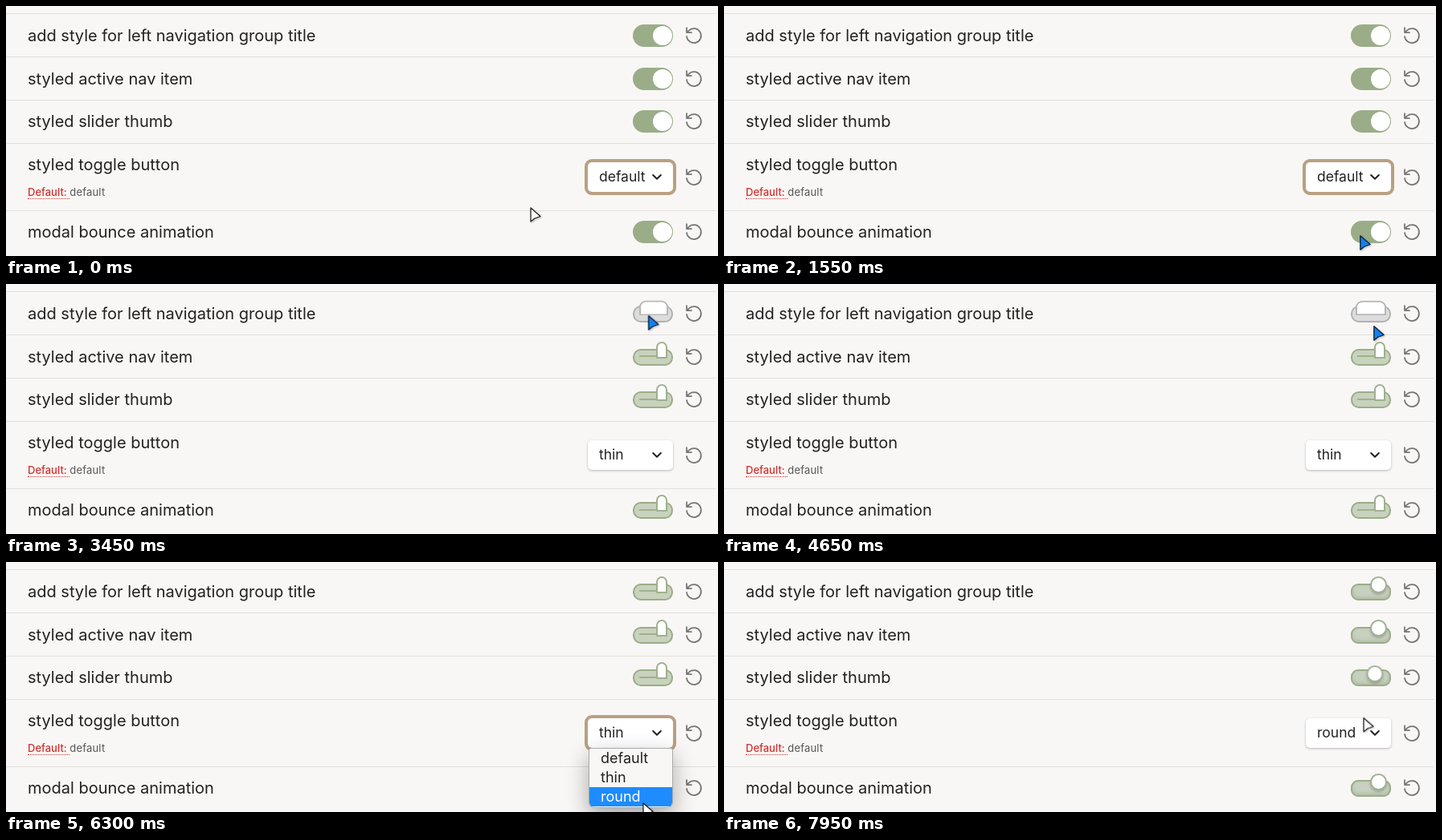
Animation of 886x312 px, one loop 8 s. Source, as an HTML page:

```html
<!DOCTYPE html>
<html lang="en">
<head>
<meta charset="utf-8">
<title>Toggle styles</title>
<style>
html, body { margin: 0; width: 100%; height: 100%; overflow: hidden; }
body { position: relative; background: #f9f7f5; color: #222; font: 20px/24px Inter, sans-serif; }
body *, body *::before { position: absolute; box-sizing: border-box; white-space: pre; }

/* Every animation shares one 8 s clock */
.track, .thumb, .press, .tap, .line, .ring, .value, .menu, .menu li, .cursor, .blue {
  animation: 8s linear infinite;
}

.row { left: 0; width: 883px; border-top: 1px solid #e2dfdb; }
.row > b { left: 27px; top: 14.8px; font-weight: 400; }
.row > svg { left: 844px; top: 14.8px; width: 24px; height: 24px; fill: none; stroke: #777; stroke-width: 1.75; stroke-linecap: round; stroke-linejoin: round; }
.row > .note ~ svg { top: 30.2px; }
.note { left: 27px; top: 52.4px; font-size: 13px; line-height: 17px; letter-spacing: .2px; color: #555; }
.note i { position: static; font-style: normal; font-weight: 500; letter-spacing: 0; color: #d0302f; border-bottom: 1px dotted #d0302f; }

.toggle { left: 780px; top: 12.8px; width: 50px; height: 28px; }
.track { left: 0; width: 50px; border: 2px solid #9aad88; animation-name: track; }
.line { left: 8px; top: 12.5px; width: 34px; height: 2px; background: #9fb08f; animation-name: line; animation-timing-function: step-end; }
.thumb { box-sizing: content-box; background: #fff; border: 2px solid #fff; transform-origin: bottom; animation-name: thumb; }
.press { animation-name: gray; }
.press .thumb { animation-name: thumb, stretch; }
.tap .thumb { animation-name: thumb, push; }

@keyframes track {
  0%, 20% { top: 0; height: 28px; border-radius: 14px; background: #9aad88; box-shadow: none; }
  22%, 80% { top: 4px; height: 21px; border-radius: 10px; background: #c8d2bd; box-shadow: none; }
  82%, 100% { top: 4px; height: 21px; border-radius: 9px; background: #c8d0c0; box-shadow: inset 0 -2px 4px #aebba4; }
}
@keyframes line { 0% { opacity: 0; } 21% { opacity: 1; } 81% { opacity: 0; } 100% { opacity: 0; } }
@keyframes thumb {
  0%, 20% { left: 25px; top: 2px; width: 20px; height: 20px; border-radius: 12px; border-color: #fff; box-shadow: none; }
  22%, 80% { left: 29px; top: -5px; width: 10px; height: 17px; border-radius: 9px 9px 1px 1px; border-color: #9fb08f; box-shadow: none; }
  82%, 100% { left: 24px; top: -4.5px; width: 17px; height: 17px; border-radius: 11px; border-color: #a3b296; box-shadow: 0 2px 3px #0003; }
}
@keyframes stretch {
  0%, 30.7% { margin-left: 0; padding-right: 0; transform: none; }
  32.5%, 34.4% { margin-left: -23px; padding-right: 24px; transform: scaleY(.86); }
  36.3%, 39.5% { margin-left: -22px; padding-right: 0; transform: none; }
  41.3%, 43% { margin-left: -23px; padding-right: 24px; transform: scaleY(.86); }
  45%, 46.3% { margin-left: 0; padding-right: 0; transform: none; }
  48%, 48.8% { margin-left: -23px; padding-right: 24px; transform: scaleY(.86); }
  50.5%, 53.8% { margin-left: -22px; padding-right: 0; transform: none; }
  55.5%, 58.2% { margin-left: -23px; padding-right: 24px; transform: scaleY(.86); }
  60%, 100% { margin-left: 0; padding-right: 0; transform: none; }
}
@keyframes gray {
  0%, 34.4% { filter: grayscale(0) brightness(1); }
  36.3%, 43% { filter: grayscale(1) brightness(1.07); }
  45%, 48.8% { filter: grayscale(0) brightness(1); }
  50.5%, 58.2% { filter: grayscale(1) brightness(1.07); }
  60%, 100% { filter: grayscale(0) brightness(1); }
}
@keyframes push {
  0%, 93.8% { transform: none; }
  95.6%, 98.4% { transform: translate(-10px, 6px); }
  99.4% { transform: translate(-4.5px, 3px); }
  100% { transform: none; }
}

.select { left: 724px; top: 195px; width: 106px; height: 37px; border-radius: 5px; background: #fff; box-shadow: 0 1px 3px #0004; }
.ring { inset: -4px; border: 4px solid #b8a182; border-radius: 9px; animation-name: ring; animation-timing-function: step-end; }
.window { left: 14px; top: 6px; width: 66px; height: 24px; overflow: hidden; }
.value { font-size: 17.5px; animation-name: value; animation-timing-function: step-end; }
.select svg { left: 80px; top: 14px; width: 12px; height: 9px; fill: none; stroke: #222; stroke-width: 2; stroke-linecap: round; stroke-linejoin: round; }

.menu { left: 725px; top: 232px; width: 105px; height: 75px; margin: 0; padding: 0; overflow: hidden; list-style: none;
  background: #f8f7f5; border: 1px solid #aaa; border-radius: 3px 3px 7px 7px; box-shadow: 0 10px 28px #0005;
  font-size: 18px; animation-name: menu; animation-timing-function: step-end; }
.menu li { left: 0; width: 100%; height: 24px; padding-left: 14px; animation-timing-function: step-end; }
.menu li:nth-child(1) { top: 0; animation-name: pick1; }
.menu li:nth-child(2) { top: 24px; animation-name: pick2; }
.menu li:nth-child(3) { top: 48px; animation-name: pick3; }

@keyframes ring { 0% { opacity: 1; } 31.25% { opacity: 0; } 68.75% { opacity: 1; } 93.8% { opacity: 0; } 100% { opacity: 0; } }
@keyframes value { 0% { top: 0; } 20% { top: -24px; } 80% { top: -48px; } 100% { top: -48px; } }
@keyframes menu {
  0% { visibility: hidden; } 5% { visibility: visible; } 19.375% { visibility: hidden; }
  69.375% { visibility: visible; } 79.375% { visibility: hidden; } 100% { visibility: hidden; }
}
@keyframes pick1 { 0% { background: #1e8cff; color: #fff; } 9.5% { background: none; color: #222; } 100% { background: none; color: #222; } }
@keyframes pick2 { 0% { background: none; color: #222; } 9.5% { background: #1e8cff; color: #fff; } 77.3% { background: none; color: #222; } 100% { background: none; color: #222; } }
@keyframes pick3 { 0% { background: none; color: #222; } 77.3% { background: #1e8cff; color: #fff; } 100% { background: #1e8cff; color: #fff; } }

.cursor { left: 0; top: 0; width: 18px; height: 24px; overflow: visible; animation-name: move; filter: drop-shadow(1px 1px 1px #0004); }
.cursor path { fill: #fff; stroke: #222; stroke-width: 1.3; stroke-linejoin: round; }
.cursor .blue { fill: #1580ee; stroke: #12304f; animation-name: blue; animation-timing-function: step-end; }
@keyframes move {
  0%, .6% { transform: translate(652px, 251px); }
  4.4%, 6.5% { transform: translate(790px, 224px); }
  10.6% { transform: translate(789px, 282px); }
  11.25%, 23% { transform: translate(791px, 286px); }
  29.5%, 39.4% { transform: translate(798px, 37px); }
  49.4% { transform: translate(800px, 42px); }
  55.6% { transform: translate(807px, 50px); }
  58.1%, 61% { transform: translate(808px, 52px); }
  68%, 68.75% { transform: translate(790px, 224px); }
  71.25%, 72.5% { transform: translate(790px, 226px); }
  78%, 81% { transform: translate(792px, 300px); }
  86.9% { transform: translate(789px, 187px); }
  89.4% { transform: translate(791px, 178px); }
  93%, 97.5% { transform: translate(795px, 150px); }
  99.4%, 100% { transform: translate(795px, 194px); }
}
/* Pointer turns blue over a toggle */
@keyframes blue {
  0%, 23.2%, 26.8%, 28.2%, 61.2%, 63.6%, 65.8%, 82.2%, 98.3%, 100% { opacity: 0; }
  19.375%, 26.1%, 27.5%, 28.9%, 62.4%, 64.6%, 79.375%, 90.7% { opacity: 1; }
}
</style>
</head>
<body>
<svg width="0" height="0"><symbol id="reset" viewBox="0 0 24 24"><path d="M3 2v6h6M3 13a9 9 0 1 0 3-7.7L3 8"/></symbol></svg>
<script>
const rows = [
  [9, 'add style for left navigation group title', 'press'],
  [62.9, 'styled active nav item', ''],
  [116.6, 'styled slider thumb', 'tap'],
  [170.5, 'styled toggle button'],
  [254.6, 'modal bounce animation', '']
];
const toggle = kind => `<div class="toggle ${kind}"><div class="track"></div><div class="line"></div><div class="thumb"></div></div>`;
const note = '<div class="note"><i>Default: </i>default</div>';
document.body.insertAdjacentHTML('beforeend', rows.map(([y, label, kind]) =>
  `<div class="row" style="top:${y}px"><b>${label}</b>${kind === undefined ? note : toggle(kind)}<svg><use href="#reset"/></svg></div>`
).join(''));
</script>
<div class="select">
  <div class="ring"></div>
  <div class="window"><div class="value">default
thin
round</div></div>
  <svg viewBox="0 0 12 9"><path d="M1.2 2 6 6.8 10.8 2"/></svg>
</div>
<ul class="menu"><li>default</li><li>thin</li><li>round</li></ul>
<svg class="cursor"><path d="M1 1V18L6 14 13 11.5Z"/><path class="blue" d="M1 1V18L6 14 13 11.5Z"/></svg>
</body>
</html>
```
